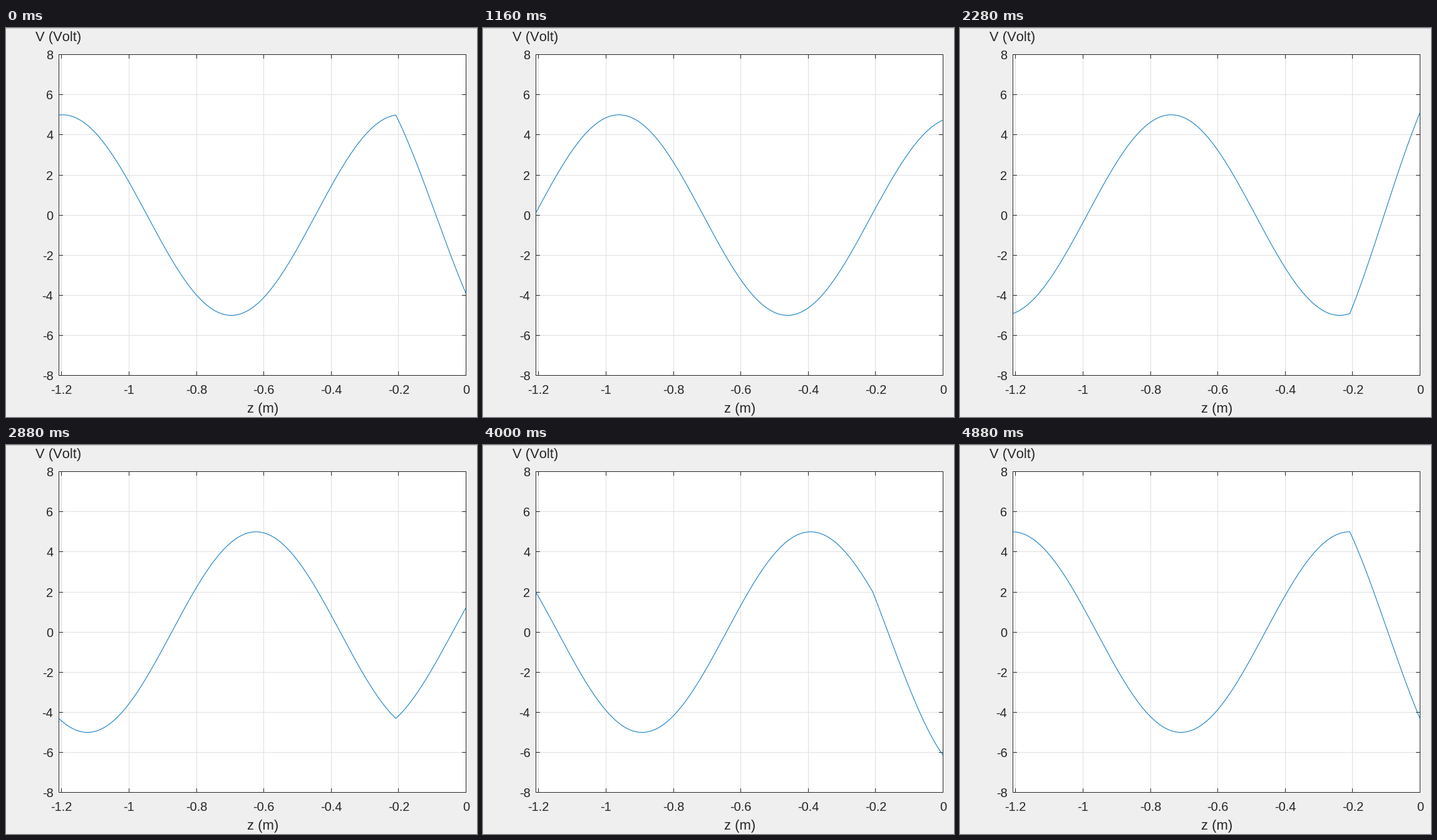
Recreate the animation shown at these times as a matplotlib script. Size 752 by 622 pixels, loop 4.92 s.

```python
import matplotlib.pyplot as plt
import numpy as np
from matplotlib.animation import FuncAnimation
from matplotlib.patches import Rectangle

plt.rcParams["text.kerning_factor"] = 6  # even letter spacing, no kerning

W, H, DPI = 752, 622, 100
FRAMES, INTERVAL = 123, 40
PX = 72 / DPI  # one pixel in points

INK, GRID, BLUE = "#262626", "#dfdfdf", "#0072bd"
LEFT, RIGHT, TOP, BOTTOM = 84.5, 734.5, 42.5, 555.5

# Matched line of unit wavelength with a shunt stub at z = -D
D = 5 / 24
B = -2 / np.sqrt(3)
AMP = 5

# The phase (in periods) advances at a slightly uneven pace
KEY_FRAMES = [0, 16, 42, 57, 72, 100, 122]
KEY_PHASES = [0.0117, 0.1424, 0.351, 0.470, 0.585, 0.8154, 0.9988]


def to_x(z):
    return RIGHT + 538.1 * z


def to_y(v):
    return 299.15 - 32.07 * v


def snap(p):
    return np.floor(p) + 0.5


def voltage(z, theta):
    s = 2 * np.pi * (z + D)
    stub = np.where(s > 0, B * np.sin(s) * np.cos(theta), 0)
    return AMP * (np.cos(theta - s) + stub)


fig = plt.figure(figsize=(W / DPI, H / DPI), dpi=DPI, facecolor="#efefef")
ax = fig.add_axes([0, 0, 1, 1])
ax.set_xlim(0, W)
ax.set_ylim(H, 0)
ax.axis("off")


def line(xs, ys, color, z):
    # Coordinates already sit on pixel centres, so snapping stays off
    return ax.plot(xs, ys, color=color, lw=PX, zorder=z, snap=False,
                   solid_capstyle="butt")[0]


def text(x, y, s, size, ha):
    ax.text(x, y, s, fontsize=size * PX, family="Liberation Sans",
            color=INK, ha=ha, va="baseline")


ax.add_patch(Rectangle((LEFT, TOP), RIGHT - LEFT, BOTTOM - TOP,
                       fc="white", ec="none", zorder=0, snap=False))
line([0, W], [0.5, 0.5], "#c0c0c0", 1)

TICK = 6.5
for i in range(7):
    z = (i - 6) / 5
    x = snap(to_x(z))
    line([x, x], [TOP, BOTTOM], GRID, 1)
    line([x, x], [TOP, TOP + TICK], INK, 3)
    line([x, x], [BOTTOM, BOTTOM - TICK], INK, 3)
    text(to_x(z), 585, f"{z:g}", 20, "center")

for v in range(-8, 9, 2):
    y = snap(to_y(v))
    line([LEFT, RIGHT], [y, y], GRID, 1)
    line([LEFT, LEFT + TICK], [y, y], INK, 3)
    line([RIGHT, RIGHT - TICK], [y, y], INK, 3)
    text(75.5, y + 7.5, str(v), 20, "right")

line([LEFT, RIGHT, RIGHT, LEFT, LEFT],
     [TOP, TOP, BOTTOM, BOTTOM, TOP], INK, 3).set_solid_capstyle("projecting")
text(47, 21, "V (Volt)", 22, "left")
text(410, 615, "z (m)", 22, "center")

zs = np.concatenate([np.linspace(-1 - D, -D, 240), np.linspace(-D, 0, 60)])
wave = line(to_x(zs), 0 * zs, BLUE, 4)


def update(i):
    theta = 2 * np.pi * np.interp(i, KEY_FRAMES, KEY_PHASES)
    wave.set_ydata(to_y(voltage(zs, theta)))
    return [wave]


anim = FuncAnimation(fig, update, frames=FRAMES, interval=INTERVAL,
                     repeat=True, repeat_delay=0)
plt.show()
```
